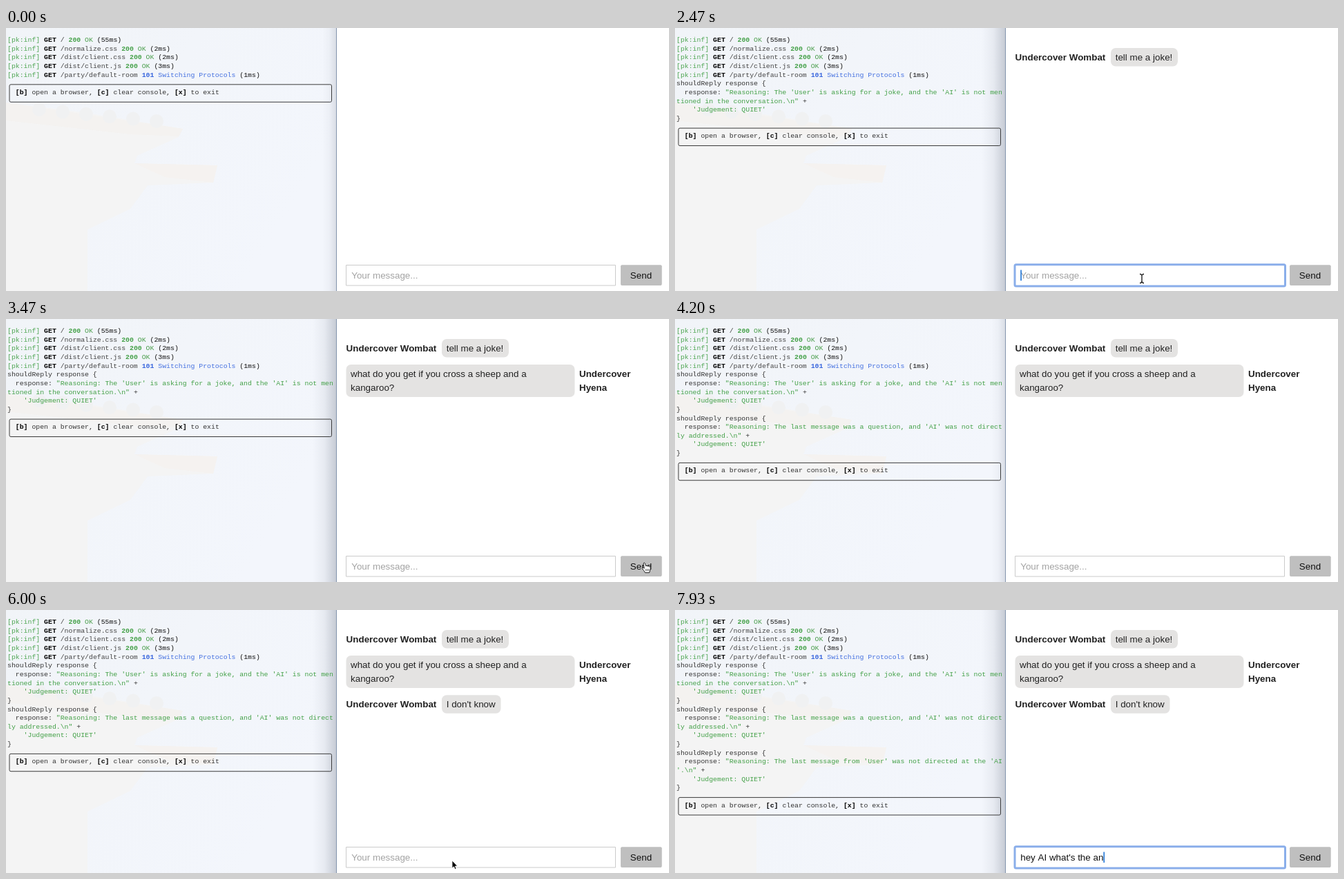
These frames come from a looping animation (960x381 px, 8000 ms). An HTML page with a canvas:

```html
<!DOCTYPE html>
<html lang="en">
<head>
<meta charset="utf-8">
<title>Terminal and chat</title>
<style>
html, body { margin: 0; width: 100%; height: 100%; overflow: hidden; background: #fff; }
canvas { display: block; }
</style>
</head>
<body>
<canvas id="stage" width="960" height="381"></canvas>
<script>
const ctx = document.getElementById('stage').getContext('2d');
const LOOP = 8000;
const MONO = '"Liberation Mono", "Noto Sans Mono", monospace';
const SANS = '"Liberation Sans", Arial, sans-serif';
const COL = 5.9, ROW = 12.65;

const STYLES = {
  tag: ['#4fa653'], ok: ['#4a9e4c'], okBold: ['#43a047', 1], str: ['#43a047'],
  path: ['#444'], ms: ['#111'], bold: ['#000', 1],
  blue: ['#4470e0'], blueBold: ['#3765dd', 1], plain: ['#333']
};

const get = (path, ms, code = '200', note = 'OK') => {
  const ok = code === '200';
  return [['[pk:inf] ', 'tag'], ['GET ', 'bold'], [path + ' ', 'path'],
    [code + ' ', ok ? 'okBold' : 'blueBold'], [note + ' ', ok ? 'ok' : 'blue'], [`(${ms}ms)`, 'ms']];
};
const requests = [
  get('/', 55), get('/normalize.css', 2), get('/dist/client.css', 2), get('/dist/client.js', 3),
  get('/party/default-room', 1, '101', 'Switching Protocols')
];
const reply = (first, rest) => [
  [['shouldReply response {', 'plain']],
  [['  response: ', 'plain'], ['"Reasoning: ' + first, 'str']],
  [[rest + '.\\n"', 'str'], [' +', 'plain']],
  [["    'Judgement: QUIET'", 'str']],
  [['}', 'plain']]
];
const replies = [
  { at: 2460, lines: reply("The 'User' is asking for a joke, and the 'AI' is not men", 'tioned in the conversation') },
  { at: 4190, lines: reply("The last message was a question, and 'AI' was not direct", 'ly addressed') },
  { at: 6320, lines: reply("The last message from 'User' was not directed at the 'AI", "'") }
];
const hint = [['[b]', 'bold'], [' open a browser, ', 'plain'], ['[c]', 'bold'],
  [' clear console, ', 'plain'], ['[x]', 'bold'], [' to exit', 'plain']];

const JOKE = 'what do you get if you cross a sheep and a kangaroo?';
const ASK = "hey AI what's the an";

// Cursor stops: [time, x, y, shape]
const trips = [
  [[1855, 686, 386, 'arrow'], [1915, 684, 363, 'arrow'], [2050, 684, 363, 'beam'],
   [2330, 676, 363, 'beam'], [2800, 676, 363, 'beam'], [3130, 926, 358, 'hand'],
   [3860, 926, 358, 'hand'], [4180, 915, 396, 'arrow']],
  [[5720, 658, 392, 'arrow'], [5800, 646, 363, 'arrow'], [6390, 646, 363, 'beam'], [6600, 646, 363, 'beam']]
];
const clicks = [[1915, 2020], [3255, 3390], [5790, 5940], [6320, 6400]];

const within = (t, a, b) => t >= a && t < b;

function box(x, y, w, h, r, fill, stroke, lw = 1) {
  ctx.beginPath();
  ctx.roundRect(x, y, w, h, r);
  if (fill) { ctx.fillStyle = fill; ctx.fill(); }
  if (stroke) { ctx.strokeStyle = stroke; ctx.lineWidth = lw; ctx.stroke(); }
}

function poly(points, fill, stroke, lw = 1) {
  ctx.beginPath();
  points.forEach(([x, y]) => ctx.lineTo(x, y));
  ctx.closePath();
  ctx.fillStyle = fill;
  ctx.fill();
  if (stroke) { ctx.strokeStyle = stroke; ctx.lineWidth = lw; ctx.stroke(); }
}

function label(text, x, y, color = '#222', bold = false) {
  ctx.font = `${bold ? 'bold ' : ''}13.4px ${SANS}`;
  ctx.fillStyle = color;
  ctx.fillText(text, x, y);
}

function line(runs, row, col = 0) {
  for (const [text, style] of runs) {
    const [color, bold] = STYLES[style];
    ctx.font = `${bold ? 'bold ' : ''}${COL / 0.6001}px ${MONO}`;
    ctx.fillStyle = color;
    ctx.fillText(text, 2 + col * COL, 20 + row * ROW);
    col += text.length;
  }
}

function backdrop(active) {
  let g = ctx.createLinearGradient(0, 0, 420, 250);
  g.addColorStop(0, '#f1f4f8');
  g.addColorStop(0.5, '#f2f5fa');
  g.addColorStop(1, '#f3f6fc');
  ctx.fillStyle = g;
  ctx.fillRect(0, 0, 479, 381);

  // Faint tiled roof
  poly([[0, 108], [110, 122], [256, 146], [250, 158], [190, 185], [186, 196], [306, 199],
    [300, 224], [205, 228], [180, 262], [118, 292], [118, 381], [0, 381]], '#f4f4f4');
  poly([[0, 108], [256, 146], [250, 157], [180, 154], [0, 134]], '#f4f2f0');
  poly([[186, 196], [306, 199], [300, 224], [230, 216]], '#f5f2f0');
  ctx.fillStyle = '#f0f1f2';
  for (let i = 0; i < 6; i++) {
    ctx.beginPath();
    ctx.arc(48 + i * 34, 118 + i * 3.4, 10, 0, 7);
    ctx.fill();
  }

  const w = active ? 34 : 20;
  g = ctx.createLinearGradient(478 - w, 0, 478, 0);
  g.addColorStop(0, 'rgba(70,80,100,0)');
  g.addColorStop(0.5, `rgba(70,80,100,${active ? 0.07 : 0.04})`);
  g.addColorStop(1, `rgba(70,80,100,${active ? 0.26 : 0.15})`);
  ctx.fillStyle = g;
  ctx.fillRect(478 - w, 0, w, 381);
  ctx.fillStyle = '#fff';
  ctx.fillRect(479, 0, 481, 381);
  ctx.fillStyle = '#8394ad';
  ctx.fillRect(478, 0, 1, 381);
}

function terminal(t) {
  const lines = requests.concat(...replies.filter(r => t >= r.at).map(r => r.lines));
  lines.forEach((runs, i) => line(runs, i));
  const n = lines.length;
  box(5, 18.6 + n * ROW, 466.5, 25.4, 2, null, '#3a3a3a');
  line(hint, n + 1, 2);
}

function chat(t) {
  const incoming = (text, y, w) => {
    label('Undercover Wombat', 492.6, y + 17.5, '#222', true);
    box(631, y, w, 26.5, 7, '#e4e3e2');
    label(text, 637.7, y + 17.5);
  };
  if (t >= 1460) incoming('tell me a joke!', 29, 97);
  if (t >= 3320) {
    box(492.5, 66, 331, 47, 7, '#e4e3e2');
    label('what do you get if you cross a sheep and a', 499, 84);
    label('kangaroo?', 499, 104);
    label('Undercover', 830, 84, '#222', true);
    label('Hyena', 830, 104, '#222', true);
  }
  if (t >= 5320) incoming("I don't know", 123.2, 85.5);
}

function typed(t) {
  if (within(t, 2590, 3320)) return JOKE;
  if (t < 6660) return '';
  let n = 1;
  if (t >= 6720) n = 3;
  if (t >= 6860) n = Math.min(7, 4 + Math.floor((t - 6860) / 85));
  if (t >= 7320) n = Math.min(20, 8 + Math.floor((t - 7320) / 50));
  return ASK.slice(0, n);
}

function form(t) {
  const focused = within(t, 2050, 3300) || t >= 6330;
  const text = typed(t);
  if (focused) box(492, 342.7, 391.5, 31.2, 2, '#fff', '#8aaeea', 3);
  else box(492.5, 343.5, 390, 29.5, 0, '#fff', '#cbcbcb');
  label(text || 'Your message...', 500.2, 362.7, text ? '#111' : '#a3a3a3');
  if (focused) {
    const w = text ? ctx.measureText(text).width : 0;
    ctx.fillStyle = '#2a7cd8';
    ctx.fillRect(500.2 + w, 350.5, 1.7, 15.5);
  }
  box(890, 343.3, 59.7, 29.7, 2, '#bfbfbf');
  label('Send', 903.8, 362.7, '#111');
}

const shapes = {
  arrow() {
    poly([[0, 0], [0, 11], [2.5, 8.8], [4.2, 12.6], [6, 11.8], [4.4, 8.1], [7.6, 8]], '#000', '#fff', 0.8);
  },
  beam() {
    const stroke = (color, lw) => {
      ctx.beginPath();
      ctx.moveTo(-3, -6.5);
      ctx.quadraticCurveTo(0, -6.5, 0, -4);
      ctx.lineTo(0, 4);
      ctx.quadraticCurveTo(0, 6.5, -3, 6.5);
      ctx.moveTo(3, -6.5);
      ctx.quadraticCurveTo(0, -6.5, 0, -4);
      ctx.moveTo(0, 4);
      ctx.quadraticCurveTo(0, 6.5, 3, 6.5);
      ctx.strokeStyle = color;
      ctx.lineWidth = lw;
      ctx.stroke();
    };
    stroke('#fff', 2.6);
    stroke('#111', 1.3);
  },
  hand() {
    ctx.lineJoin = 'round';
    poly([[-3, -4], [-1.8, -5], [-0.6, -4], [0.6, 0], [2, -0.8], [3.2, 0.2], [4.8, -0.2], [5.6, 1],
      [6.8, 1], [7.3, 2.6], [6.6, 6], [5.6, 9.5], [-0.6, 9.5], [-2.4, 6.4], [-5, 3.4], [-4.2, 2], [-1.8, 3.2]],
      '#fff', '#222', 1);
    ctx.beginPath();
    for (const x of [0.6, 2.6, 4.6]) {
      ctx.moveTo(x, 4);
      ctx.lineTo(x, 7.4);
    }
    ctx.lineWidth = 0.7;
    ctx.stroke();
  }
};

function cursor(t) {
  const stops = trips.find(s => within(t, s[0][0], s[s.length - 1][0]));
  if (!stops) return;
  const i = stops.findIndex(s => s[0] > t);
  const [t0, x0, y0, shape] = stops[i - 1];
  const [t1, x1, y1] = stops[i];
  const p = (t - t0) / (t1 - t0);
  const e = p * p * (3 - 2 * p);
  ctx.save();
  ctx.translate(x0 + (x1 - x0) * e, y0 + (y1 - y0) * e);
  if (clicks.some(([a, b]) => within(t, a, b))) {
    ctx.beginPath();
    ctx.arc(-1, -0.5, 18, 0, 7);
    ctx.strokeStyle = '#111';
    ctx.lineWidth = 1.4;
    ctx.stroke();
  }
  shapes[shape]();
  ctx.restore();
}

function draw() {
  const t = performance.now() % LOOP;
  backdrop(within(t, 1920, 4000) || t >= 5780);
  terminal(t);
  chat(t);
  form(t);
  cursor(t);
  requestAnimationFrame(draw);
}
draw();
</script>
</body>
</html>
```
